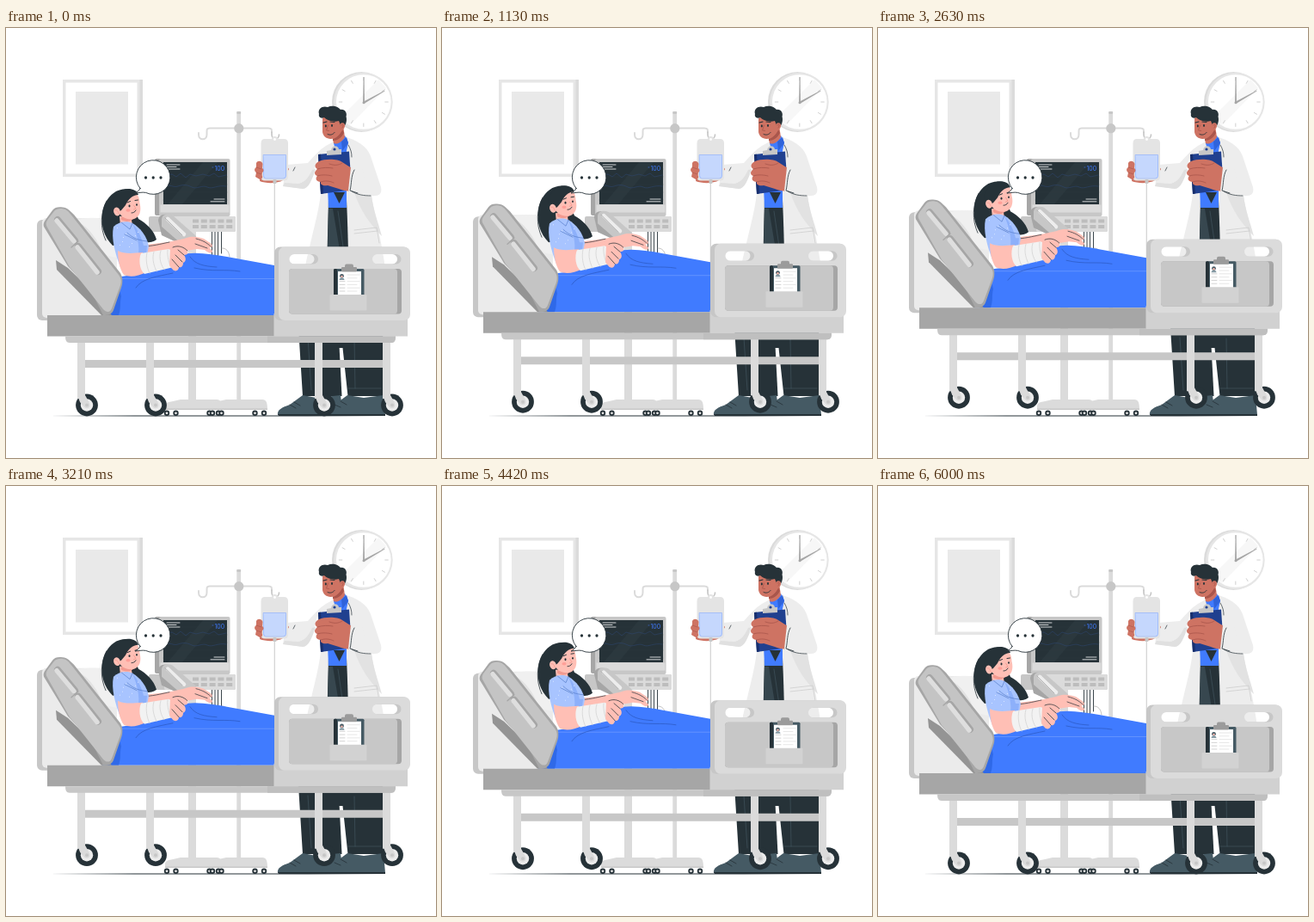
Animation, 500 px wide and 500 px high, one loop 6.04 s. Source, as an HTML page with a canvas:

```html
<!DOCTYPE html>
<html lang="en">
<head>
<meta charset="utf-8">
<title>Hospital visit</title>
<style>
html, body { margin: 0; width: 100%; height: 100%; overflow: hidden; background: #fff; }
canvas { display: block; width: 100vw; height: 100vh; }
</style>
</head>
<body>
<canvas id="stage"></canvas>
<script>
const canvas = document.getElementById('stage');
const ctx = canvas.getContext('2d');
const LOOP = 6040, HALF = 3000, LIFT = 10;
const INK = '#263238', SLATE = '#455a64', BLUE = '#407bff';
const G1 = '#ededed', G2 = '#e6e6e6', G3 = '#dbdbdb', G4 = '#c7c7c7', G5 = '#a6a6a6';
const BROWN = '#ce7363', BROWN2 = '#a9564c', PINK = '#ffbfb5', PINK2 = '#f29a90';

function fill(color, d) {
  ctx.fillStyle = color;
  ctx.fill(new Path2D(d));
}
function line(color, w, d) {
  ctx.strokeStyle = color;
  ctx.lineWidth = w;
  ctx.stroke(new Path2D(d));
}
function box(color, x, y, w, h, r = 0) {
  ctx.fillStyle = color;
  ctx.beginPath();
  ctx.roundRect(x, y, w, h, r);
  ctx.fill();
}
function dot(color, x, y, r, ry = r, turn = 0) {
  ctx.fillStyle = color;
  ctx.beginPath();
  ctx.ellipse(x, y, r, ry, turn, 0, Math.PI * 2);
  ctx.fill();
}

function picture() {
  box(G3, 66, 60, 93, 113);
  box(G2, 66, 60, 89.5, 113);
  box('#fff', 69.5, 63.5, 83, 106);
  box('#e9e9e9', 81, 74, 61, 84.5);
}

function clock() {
  dot(G3, 413.5, 86, 34.5, 35);
  dot(G2, 415.5, 86, 34.2);
  dot('#fff', 415.8, 86, 31.8);
  fill('#f7f7f7', 'M389 104L433 60L442 70L400 113Z');
  for (let i = 0; i < 12; i++) {
    const a = i * Math.PI / 6, c = Math.cos(a), s = Math.sin(a);
    line('#c4c4c4', 0.8, `M${415.8 + c * 25} ${86 + s * 25}L${415.8 + c * 28.5} ${86 + s * 28.5}`);
  }
  fill(G5, 'M415.6 57L416.6 57L417 88L415 88Z');
  fill(G5, 'M415 86L440 72.7L440.4 73.5L416.3 88Z');
  dot(G5, 416, 86.7, 1.5);
}

function trolley(x) {
  for (const dx of [2, 12.5, 51.5, 62]) {
    dot(INK, x + dx, 447.8, 3.2);
    dot(G2, x + dx, 447.8, 1.4);
  }
  fill(G3, `M${x} 444V440C${x} 436 ${x + 3} 435 ${x + 7} 434.5L${x + 18} 432H${x + 60}C${x + 65} 432 ${x + 66} 436 ${x + 66} 444Z`);
  box(G4, x, 442.5, 66, 1.5);
}

function monitor() {
  box(G3, 212, 230, 9, 204);
  trolley(185);
  line(INK, 0.9, 'M239.5 236V270M243 236V268M246.5 236V268M250.5 236V262');
  line(G5, 0.7, 'M251 256C256 256 259 259 260 266');
  box(G4, 166, 219, 101, 18, 2);
  box(G3, 184, 219, 83, 18, 2);
  for (let i = 0; i < 5; i++) {
    for (let j = 0; j < 2; j++) {
      box('#bdbdbd', 217 + i * 9.8, 222.5 + j * 6.5, 7, 4);
    }
  }
  box(G5, 173, 152, 12, 66, 2);
  box(G4, 178, 152, 82.5, 67, 2);
  box(G3, 179.5, 205.5, 80, 9);
  box(INK, 183, 156, 74, 49);
  fill('#2b383e', 'M188 205L229 156H246L205 205Z');
  for (let i = 0; i < 5; i++) line('#303d43', 0.35, `M183 ${164 + i * 9}H257`);
  line('#2f4877', 0.5, 'M185 172L193 170L198 173L203 169L209 174L214 170L221 172L229 170L236 172L242 169L247 173L256 171');
  line('#2f4877', 0.5, 'M185 184C191 181 194 186 200 184S210 182 216 185S228 182 234 185S246 182 256 184');
  line('#fff', 0.8, 'M187 159H202M187 161.5H198M187 164H202M242 199H254M238 201.8H254');
  ctx.fillStyle = BLUE;
  ctx.font = '7px Inter, Arial, sans-serif';
  ctx.textAlign = 'left';
  ctx.fillText('100', 242.5, 166);
  line(BLUE, 0.6, 'M240 162H241');
}

function drip() {
  box(G3, 268.3, 97, 4.8, 337, 1);
  box(G4, 268.3, 97, 4.8, 3, 1);
  line(G3, 2, 'M270 116.5H237C233.5 116.5 233.5 118 233.5 121V124C233.5 131 224 131 224 124V122');
  line(G3, 2, 'M271 116.5H305C309 116.5 309 118 309 121');
  line(G4, 1.7, 'M309 121V124C309 130.5 317.5 130.5 317.5 124');
  dot(G4, 270.8, 116.7, 5.6);
  trolley(238);
}

function bag() {
  // far hand behind the pouch
  fill(BROWN, 'M329 164L322 177C316 181 302 181 295 178L297 157L310 172L320 167L326 160Z');
  fill('#e4e4e4', 'M296.5 134Q296.5 129 301 129H309Q309 126 312.5 126T316 129H323Q328 129 328 134V173Q328 177.5 323 177.5H301Q296.5 177.5 296.5 173Z');
  dot('#fff', 312.5, 129.5, 1.4);
  box('#c5d7fd', 299, 148, 26.5, 26.5, 1.5);
  line('#8bafff', 0.7, 'M299.5 147.5H325.5V172Q325.5 175 322 175H302Q299.5 175 299.5 172Z');
  box(G4, 310.5, 176, 4, 5, 1);
  line('#d2d2d2', 1.2, 'M312.3 181V300');
  fill(BROWN, 'M291 157C293 153 298 155 298.5 158L298 163C300 164 300 167 298 168L297.5 171C299 173 298 176 295 176L290 173L291 168C288 166 289 163 291 162Z');
  line(BROWN2, 0.6, 'M291 162L297 164M291 168L297 170');
}

function legs() {
  fill(INK, 'M339.5 340H386L390.5 428H345Z');
  fill(INK, 'M385 340H438L439 428H397.5L391.5 372H385Z');
  line(SLATE, 0.6, 'M351 360L355 421M405 361L406 419M398 419H436');
  fill(SLATE, 'M345 427L361 430L389 427L392 450H316C315 444 321 441 330 438Z');
  fill(SLATE, 'M397 427L416 430L439 427L441 450H367C366 444 373 441 382 438Z');
  fill(INK, 'M316 449H441V451H317Z');
  line(INK, 0.8, 'M330 438L337 442M335 435L342 439M382 438L389 441M389 434L396 438');
}

function doctor() {
  legs();
  fill(G1, 'M372 137L392 126C409 130 420 138 424 149L436 185C438 194 432 196 425 195C428 216 436 238 444 300H343C356 237 364 215 366 191L362 151C357 174 352 187 345 187L322 184L326 159L351 157C358 149 364 142 372 137Z');
  fill('#e0e0e0', 'M322 184L345 187C352 187 356 176 360 164L356 165C351 176 345 181 339 181L324 180Z');
  fill('#e2e2e2', 'M405 191C414 195 420 196 425 195C427 211 433 227 437 242C424 229 411 211 405 191Z');
  fill(INK, 'M375 200H396C397 221 397.5 240 398 262H373.5Z');
  fill('#37474f', 'M375 210H380L388 258H374Z');
  line(SLATE, 0.6, 'M386 213L392 254');
  fill(BLUE, 'M374 185H396V209H375Z');
  fill(INK, 'M381 191H394L387.5 204Z');
  fill(BLUE, 'M381 134L394 125L398 133L395 148H385Z');
  fill('#2f63da', 'M390 132L396 127L398 134L391 143Z');
  line(INK, 0.7, 'M336 162L334 166M398 136C401 141 402 145 402 150');
  line(INK, 0.7, 'M402 190C409 194 416 195 424 195');
  line('#cfcfcf', 0.8, 'M405 235L431 232L434 250M405 239L432 236');

  // head
  fill(BROWN, 'M378 121L392 113L394 127C390 133 385 136 381 134Z');
  fill(BROWN2, 'M380 129C385 127 389 123 391 118L393 122C390 128 385 131 380 131Z');
  fill(BROWN, 'M368 105C373 99 391 101 393 108C394 116 388 126 381 128.5C374 130 369 127 368 121Z');
  fill(INK, 'M364 100C362 93 369 90 374 92C380 89 387 92 389 95C394 94 397 99 395.5 103C397 108 395 113 392 116L389 113L387 108C380 110 373 107 370 104C366 106 363 103 364 100Z');
  dot(BROWN, 391, 114, 3, 3.8, 0.2);
  line(BROWN2, 0.7, 'M390 113C392 111 393 113 391 116');
  dot(INK, 371.8, 114, 1, 1.4);
  dot(INK, 379, 113.5, 1, 1.4);
  line(INK, 1.1, 'M369 110L373 109M377 109L382 109.5');
  line(BROWN2, 0.8, 'M374.5 113L372.5 119L375.5 119.5');
  line(INK, 0.9, 'M374 123.5C377 125 380 124 382 121.5');

  // clipboard and near hand
  fill('#20408f', 'M363 147L399 143.5L402 188L366 193Z');
  fill('#182f6d', 'M363 147L366 146.7L369 192.6L366 193Z');
  fill(G4, 'M373 148L373 143L378 142C379 136 386 136 387 141L390 141V147Z');
  dot('#20408f', 382, 141, 1.6);
  fill(BROWN, 'M402 163L391 156C386 152 371 152 364 155C359 157 358 162 362 164C358 167 358 171 362 172C359 175 361 179 366 179C365 182 369 184 374 183L387 187C392 189 397 190 400 189Z');
  line(BROWN2, 0.8, 'M362 164C368 162 375 162 380 163M362 172C368 170 375 171 379 172M366 179C371 177 377 178 381 180M391 157C386 160 382 160 376 158');
  fill(G1, 'M401 162L414 163L420 192L398 189Z');
  line(INK, 0.8, 'M405 165C401 172 402 181 400 189L409 192');
}

function pillowAndRails() {
  box(G4, 36, 223, 24, 117, 6);
  box('#ebebeb', 42, 221, 87, 116, 5);
  fill('#f0f0f0', 'M81 224C92 219 110 221 125 223L133 268L113 264Z');
  fill('#e2e2e2', 'M81 224C93 229 103 240 111 258L119 266L99 251Z');
  // far rail
  fill(G5, 'M177 224C177 218 184 215 190 218L222 244L213 256L181 241Z');
  fill(G4, 'M181 222C182 216 190 215 195 219L220 241C224 246 221 251 216 251H204L181 231Z');
  line('#ededed', 4.5, 'M188 222L207 240');
  line(G5, 0.8, 'M185 221L205 241');
}

function patient() {
  fill(INK, 'M125 192C133 186 145 186 150 191C155 199 150 215 154 222C163 227 172 235 175 246C166 253 151 246 139 250L124 253C114 243 110 230 112 216C113 206 118 197 125 192Z');
  line(INK, 0.8, 'M117 201C110 214 109 232 116 247');
  fill(PINK, 'M132 219L145 218L147 229C143 235 137 234 133 230Z');
  fill(PINK2, 'M134 219C141 222 147 220 151 216L147 223C142 226 138 225 134 223Z');
  fill(PINK, 'M130 208C134 201 140 194 147 191C153 192 155.5 197 155.5 204C158 213 155 220 149 222C141 224 134 220 130 213Z');
  fill(INK, 'M123 206C125 194 134 187 142 187C148 187 152 189 154 194C147 194 142 199 139 206L134 212L129 215Z');
  dot(PINK, 129, 213.5, 3.8, 5, -0.3);
  line(PINK2, 0.8, 'M127 212C129 211 131 214 131 216');
  dot(INK, 143.5, 207, 1, 1.4);
  dot(INK, 152, 205.5, 0.9, 1.3);
  line(INK, 1, 'M141 203L144.5 201.5M150 200.5L153.5 200');
  line(PINK2, 0.9, 'M148.5 206L151 210L148.5 211');
  line(INK, 0.9, 'M146 215C148 215 150 214 151 212');
  dot('#ff9f98', 142, 212, 2.6, 1.8);

  // far arm
  fill(PINK, 'M154 253L188 249L207 245C216 241 224 243 230 245L239 251C241 254 239 256 236 255L240 259C240 263 235 262 231 258L222 257L204 260L164 267Z');
  line(INK, 0.7, 'M221 245C229 247 234 250 238 254M220 251L234 256M161 254C175 253 184 250 190 249');
  // gown
  fill('#a8c4ff', 'M125 231C131 225 141 224 147 227C156 232 164 242 166 254L162 273L133 278C127 263 122 244 125 231Z');
  fill('#8db0fa', 'M147 227C153 234 158 244 160 253L164 253L162 273L151 275C158 259 153 242 147 227Z');
  line('#587fca', 0.7, 'M134 226L144 234L147 227M138 240L152 247M141 238C148 245 155 247 164 248');
  ctx.fillStyle = '#d7e4ff';
  for (let i = 0; i < 9; i++) {
    ctx.fillRect(129 + i * 7 % 25, 232 + i * 11 % 24, 1, 1);
  }
}

function sheet() {
  fill(BLUE, 'M112 334L124 287L134 289C151 287 183 278 202 264C218 259 239 263 257 266L312 276V334Z');
  fill('#2f69e8', 'M118 334L132 304L134 312C132 320 134 326 131 334Z');
  line('#729cff', 0.7, 'M134 291.5H312');
  line('#2b58bd', 0.7, 'M151 302C158 291 176 289 194 285M214 266C220 275 230 277 245 278M219 279C241 284 254 280 272 283');
}

function cast() {
  fill(PINK, 'M130 259C138 263 147 262 159 261L163 284C153 289 144 290 137 287C132 280 130 269 130 259Z');
  fill('#f2f2f2', 'M157 262L189 257L194 259L195 278L161 286C155 281 154 269 157 262Z');
  line('#d3d3d3', 0.8, 'M164 261C162 270 164 279 167 285M172 260C169 270 173 278 175 283M180 259C177 268 181 277 184 281M188 258C187 265 190 275 192 279');
  fill(PINK, 'M191 256C197 252 204 253 210 258C213 261 211 264 207 264C210 268 209 272 206 273C206 277 204 279 201 278C201 282 197 284 194 281L190 276Z');
  line(INK, 0.75, 'M200 258L207 264M197 264L205 272M193 269L201 278M194 255C201 252 207 255 211 259');
}

function nearRail() {
  fill('#949494', 'M58 270L72 279L100 306L123 334H111L59 281Z');
  fill(G5, 'M44 231C43 228 44 226 46 223L54 212C57 208 61 208 66 208.5C71 209 74 212 79 217L133 285C136 290 136 297 134 302L125 328C123 333 119 334 113 334L99 306L72 277Z');
  fill('#c4c4c4', 'M47 230C46 227 47 225 49 222L56 213C59 210 63 209.5 67 210.5C71 211 74 215 78 220L131 287C135 292 134 297 132 302L123 326C121 331 117 331 113 327L74 278Z');
  for (const [x, y, x2, y2] of [[60, 223, 80, 247], [84, 254, 107, 283]]) {
    line(G5, 8, `M${x} ${y}L${x2} ${y2}`);
    line('#dedede', 5.5, `M${x - 1} ${y + 1}L${x2 - 1} ${y2 + 1}`);
  }
  line(G5, 1.3, 'M76 255L84 248');
}

function wheel(x) {
  dot(INK, x, 438.5, 12.9);
  dot('#ececec', x, 438.5, 7.2);
  box(G3, x - 11, 365, 9, 66);
  fill(G3, `M${x - 11} 427H${x - 2}L${x + 3} 436C${x + 5} 441 ${x + 1} 444 ${x - 3} 441L${x - 8} 435Z`);
  dot(G4, x, 438.5, 2);
}

function frame() {
  box(G4, 92, 386, 347, 9);
  [94, 174, 370, 449].forEach(wheel);
  box(G5, 48, 334, 264, 24.5);
  box('#d1d1d1', 311.5, 332, 155.5, 26.5);
  fill(G4, 'M69 358.5H453C453 363 452 366 448 366H74C70 366 69 363 69 358.5Z');
  fill('#bfbfbf', 'M304 358.5H453C453 363 452 366 448 366H304Z');
}

// one face of the board, with two open grips
function board(color, x, w, shift) {
  const d = new Path2D();
  d.roundRect(x, 254.5, w, 85.5, 7);
  for (const grip of [329.5, 426]) d.roundRect(grip + shift, 263, 33.5, 11.5, 5.7);
  ctx.fillStyle = color;
  ctx.fill(d, 'evenodd');
}

function footboard() {
  board(G4, 312, 157, -4.5);
  board(G3, 317, 153, 0);
  box(G5, 329, 280, 131, 52.5, 4);
  box(G4, 329, 280, 126, 52.5, 4);
  box(SLATE, 381, 280, 35.5, 34, 1.5);
  box(INK, 381, 280, 4, 34, 1.5);
  box('#fff', 386, 283, 27, 30);
  box('#9b9b9b', 390, 278, 18, 5.5, 1);
  box('#9b9b9b', 394, 274.5, 10, 6, 2);
  dot(SLATE, 390.5, 288.3, 2.4);
  dot('#f2b4aa', 390.5, 289, 1.3);
  fill('#8499a3', 'M387.5 293C387.5 289.7 393.5 289.7 393.5 293Z');
  for (let i = 0; i < 6; i++) {
    line('#d6d6d6', 0.6, `M397 ${287 + i * 3.8}H${i % 2 ? 408 : 411}`);
    if (i > 1) line('#b5b5b5', 0.6, `M388 ${287 + i * 3.8}H394`);
  }
  box('#d2d2d2', 376.5, 310, 43, 18.5, 1);
}

function bubble() {
  const d = 'M156 186.4A19.8 19.8 0 1 1 162.5 191.4C158 190.5 154 192 150 192C153 190.5 155 189 156 186.4Z';
  fill('#fff', d);
  line(INK, 0.9, d);
  for (const x of [162.5, 171.2, 180]) dot(INK, x, 174, 1.65);
}

function paint(t) {
  ctx.setTransform(canvas.width / 500, 0, 0, canvas.height / 500, 0, 0);
  ctx.fillStyle = '#fff';
  ctx.fillRect(0, 0, 500, 500);
  ctx.lineCap = ctx.lineJoin = 'round';
  picture();
  clock();
  fill(INK, 'M50 451L150 450.6H350L442 451L350 451.5H150Z');
  monitor();
  drip();
  doctor();
  bag();

  const lift = LIFT * Math.max(0, 1 - Math.abs(1 - t / HALF));
  ctx.save();
  ctx.translate(0, -lift);
  pillowAndRails();
  patient();
  sheet();
  cast();
  nearRail();
  frame();
  footboard();
  ctx.restore();
  bubble();
}

function resize() {
  const ratio = devicePixelRatio || 1;
  canvas.width = Math.round(innerWidth * ratio);
  canvas.height = Math.round(innerHeight * ratio);
}

let start;
function tick(now) {
  if (start === undefined) start = now;
  paint((now - start) % LOOP);
  requestAnimationFrame(tick);
}
addEventListener('resize', resize);
resize();
paint(0);
requestAnimationFrame(tick);
</script>
</body>
</html>
```
